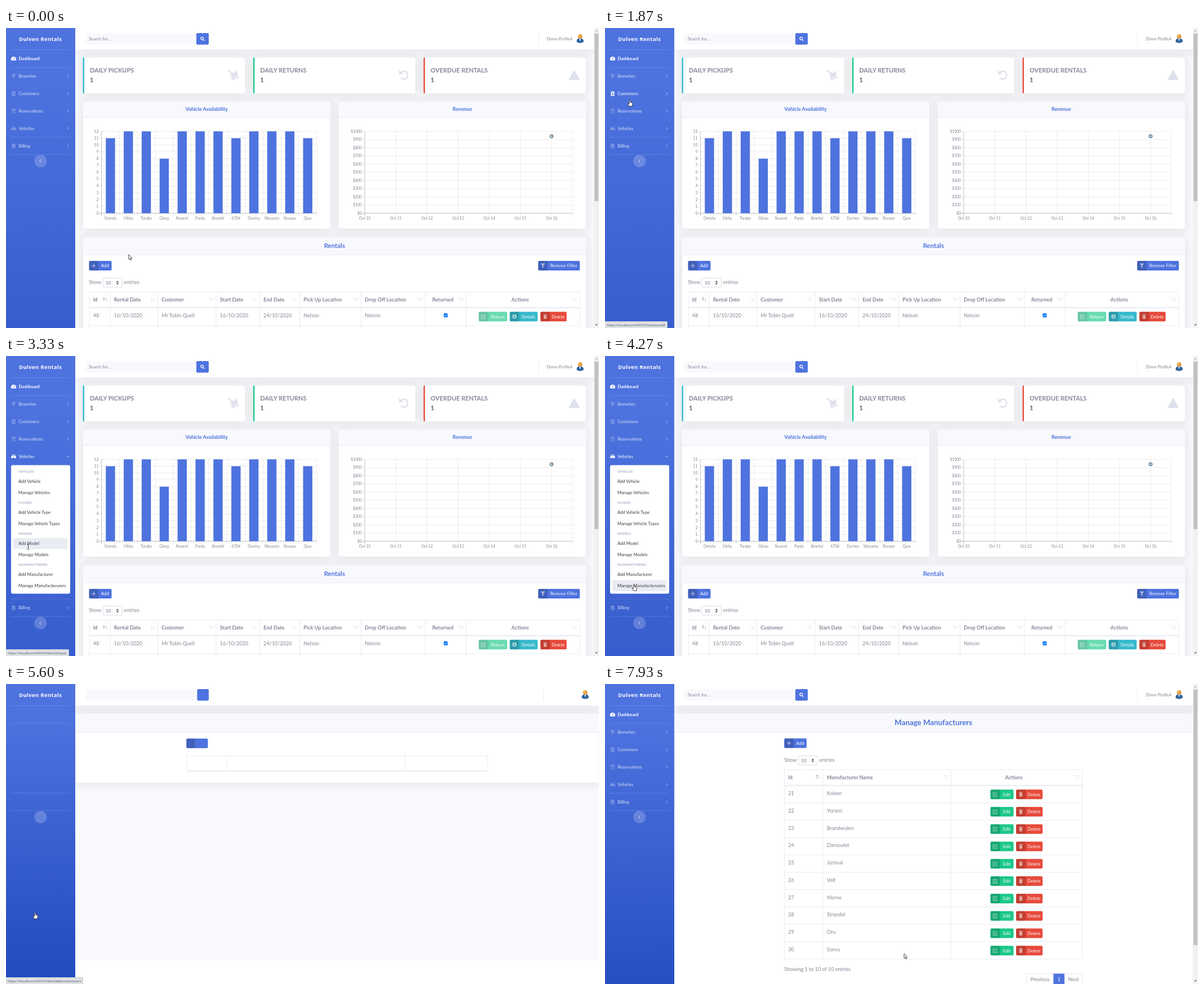
Write an HTML page that moves like this. It is 1053x532 px and loops after 8 s.

```html
<!DOCTYPE html>
<html lang="en">
<head>
<meta charset="utf-8">
<title>Rental dashboard</title>
<style>
  html, body { margin: 0; width: 100%; height: 100%; overflow: hidden; background: #fff; }
  #stage { position: absolute; left: 0; top: 0; width: 1053px; height: 532px; overflow: hidden; }
  svg { display: block; font-family: Lato, "Open Sans", sans-serif; }
  .page { display: none; }
  .dash #dash, .blank #blank, .list #list { display: inline; }
  .blank .ink { display: none; }
  .item { opacity: .8; }
  .item .icon { opacity: .38; }
  .item.on, .item.on .icon { opacity: 1; }
  .entry rect { fill: none; }
  .entry.on rect { fill: #eaecf4; }
  .entry.pressed rect { fill: #dddfeb; }
  #status {
    position: absolute; left: 0; bottom: 0; box-sizing: border-box; height: 12px; padding: 0 3px;
    background: #dee1e6; border: solid #c3c6ca; border-width: 1px 1px 0 0; border-radius: 0 2px 0 0;
    color: #50545a; font: 6.15px/11px "Open Sans", sans-serif; white-space: nowrap;
  }
  #pointer { position: absolute; left: 0; top: 0; overflow: visible; }
</style>
</head>
<body>
<div id="stage" class="dash">
  <svg id="view" width="1053" height="532" viewBox="0 0 1053 532"></svg>
  <div id="status"></div>
  <svg id="pointer" width="1" height="1"><path id="cursor" stroke-linejoin="round"/></svg>
</div>
<script>
const BLUE = '#4e73df', GREEN = '#1cc88a', CYAN = '#36b9cc', RED = '#e74a3b';
const GRAY = '#858796', LINE = '#e3e6f0', PALE = '#f8f9fc', FAINT = '#dddfeb';
const $ = id => document.getElementById(id);
const each = (list, fn) => list.map(fn).join('');

const text = (x, y, s, size = 9.05, fill = GRAY, weight = 400, anchor = 'start', more = '') =>
  `<text x="${x}" y="${y}" font-size="${size}" fill="${fill}" font-weight="${weight}" text-anchor="${anchor}" ${more}>${s}</text>`;
const rect = (x, y, w, h, fill, more = '') =>
  `<rect x="${x}" y="${y}" width="${w}" height="${h}" fill="${fill}" ${more}/>`;
const stroke = (d, color, width = .8, more = '') =>
  `<path d="${d}" fill="none" stroke="${color}" stroke-width="${width}" ${more}/>`;
const card = (x, y, w, h, r = 3) =>
  rect(x, y, w, h, '#fff', `rx="${r}" stroke="${LINE}" stroke-width=".6" filter="url(#shadow)"`);
const header = (x, y, w, h) =>
  rect(x, y, w, h, PALE, 'rx="2"') + stroke(`M${x} ${y + h}h${w}`, LINE);

const solid = d => `<path d="${d}" fill-rule="evenodd" fill="#fff"/>`;
const outline = (d, w = 1) => stroke(d, '#fff', w);
const ICON = {
  plus: outline('M-3.3 0H3.3M0-3.3V3.3', 1.3),
  filter: solid('M-4-4H4L1.1-.3V4L-1.1 2.4V-.3Z'),
  edit: outline('M1-3H-3.5V3.5H3V.5M-1 1.2L3.6-3.4', 1.1),
  trash: solid('M-3.3-4H-1L-.6-4.6H.6L1-4H3.3V-3H-3.3ZM-2.8-2.4H2.8L2.4 4H-2.4Z'),
  info: solid('M0-4A4 4 0 1 1 0 4A4 4 0 1 1 0-4ZM-.6-2.6V-1.4H.6V-2.6ZM-.7-.6V2.5H.7V-.6Z'),
  gauge: solid('M-4 3A4.6 4.6 0 1 1 4 3ZM.6 1.9L1.9-2L1.2-2.2L-.3 1.5A.8.8 0 0 0 .6 1.9Z'),
  pin: solid('M0 4.2C-1-.1-2.8.3-2.8-1.5A2.8 2.8 0 0 1 2.8-1.5C2.8.3 1-.1 0 4.2ZM0-2.6A1.1 1.1 0 1 0 0-.4A1.1 1.1 0 1 0 0-2.6Z'),
  book: solid('M-3-4H3V4H-3ZM0-2.4A1.2 1.2 0 1 0 0 0A1.2 1.2 0 1 0 0-2.4ZM-2 2.2H2Q2 .6 0 .6T-2 2.2Z'),
  calendar: solid('M-3.6-3.2H-2V-4.4H-1V-3.2H1V-4.4H2V-3.2H3.6V4H-3.6ZM-2.8-1.4V3.2H2.8V-1.4Z') + outline('M-1.8 0H1.8M-1.8 1.8H1.8', .8),
  car: solid('M-4.3 0L-3.3-.6L-2.4-3H2.4L3.3-.6L4.3 0V2.4H3.4V3.5H1.9V2.4H-1.9V3.5H-3.4V2.4H-4.3ZM-2.2-.7H2.2L1.6-2.1H-1.6Z'),
  file: solid('M-3-4H.8L3-1.8V4H-3ZM-1.6-.2H1.6V.6H-1.6ZM-1.6 1.6H1.6V2.4H-1.6Z'),
  search: outline('M1.7 1.2A2.4 2.4 0 1 0 1.2 1.7L3.6 4', 1.3)
};
const icon = (name, x, y, opacity = 1, cls = '') =>
  `<g class="${cls}" transform="translate(${x} ${y})"${cls ? '' : ` opacity="${opacity}"`}>${ICON[name]}</g>`;

const button = (x, y, w, color, name, label, opacity = 1) =>
  `<g opacity="${opacity}">` + rect(x, y, w, 17, color, 'rx="2"') + rect(x, y, 16.8, 17, '#000', 'rx="2" opacity=".16"') +
  icon(name, x + 8.4, y + 8.5, .55) + text(x + (16.8 + w) / 2, y + 11.3, label, 7.9, '#fff', 400, 'middle') + '</g>';

const sorter = (x, y, up) =>
  stroke(`M${x - 2} ${y + 3}V${y - 3}M${x - 3.5} ${y - 1.5}L${x - 2} ${y - 3}L${x - .5} ${y - 1.5}`, up ? GRAY : FAINT) +
  stroke(`M${x + 2} ${y - 3}V${y + 3}M${x + .5} ${y + 1.5}L${x + 2} ${y + 3}L${x + 3.5} ${y + 1.5}`, up ? '#b8bac6' : FAINT);

const pageSize = (x, y) =>
  text(x, y, 'Show') + rect(x + 25, y - 10.5, 34.5, 16.5, '#fff', 'rx="2.5" stroke="#d1d3e2" stroke-width=".8"') +
  text(x + 29.5, y + .8, '10', 8.4, '#6e707e') +
  `<path d="M${x + 48.5} ${y - 3}l2.2-2.5 2.2 2.5zm0 1.6h4.4l-2.2 2.5z" fill="#3a3b45"/>` + text(x + 62.3, y, 'entries');

const topbar = (right, full) => {
  const split = full ? 338 : 339.5;
  return rect(123, 0, 930, 38.5, '#fff', 'filter="url(#shadow)"') +
    rect(140.5, 9, split - 138, 20.5, PALE, 'rx="2.5"') + rect(split, 9, 360 - split, 20.5, BLUE, 'rx="2"') +
    (full ? text(147, 21.5, 'Search for...', 7.6, '#7d8090') + icon('search', 348.5, 18.7) +
      text(right - 38, 21.5, 'Demo Profile4', 7.2, GRAY, 400, 'end') : '') +
    stroke(`M${right - 98.5} 8.5V30`, LINE) +
    `<g transform="translate(${right - 24.5} 19)"><path d="M-6.3 5.5Q-6-1 0-1T6.3 5.5Q0 9.5-6.3 5.5Z" fill="#2a619f"/>
     <path d="M-1.6 0L0 5L1.6 0Z" fill="#dfe8f0"/><circle cy="-4" r="4" fill="#e39a3c"/><circle cx="-.8" cy="-5" r="2" fill="#f2bd6c"/></g>`;
};

const scrollbar = end =>
  rect(1044, 0, 9, 532, '#f1f1f1') + rect(1045, 10, 7, end - 10, '#c1c1c1') +
  '<path d="M1046.5 6.5l2-2.5 2 2.5z" fill="#a3a3a3"/><path d="M1046.5 525.5l2 2.5 2-2.5z" fill="#505050"/>';

// Dashboard
const stat = (x, color, label, art) =>
  card(x, 52, 288.5, 64) + `<path d="M${x + 2.4} 52h-.4q-2 0-2 2.5v59q0 2.5 2 2.5h.4z" fill="${color}"/>` +
  text(x + 12.5, 78.5, label, 10.9, GRAY, 700) + text(x + 12.5, 96, '1', 10.9, '#5a5c69', 700) +
  `<g transform="translate(${x + 267.5} 83.5)">${art}</g>`;

const dolly = stroke('M-10-7.5H-6.5L-2 5M1 6L9 3.2', FAINT, 2) +
  `<path d="M-4-4L-.5-5.3L.5-2.5L2.6-3.3L1.6-6L5-7.2L8 1L-1 4.2Z" fill="${FAINT}"/>` +
  `<circle cx="-1" cy="6.3" r="2" fill="#fff" stroke="${FAINT}" stroke-width="1.6"/>`;
const undo = stroke('M-6-3.5A7 7 0 1 1-5.2 5', FAINT, 2.3) + `<path d="M-8.5-8.5V-1.5H-1.5Z" fill="${FAINT}"/>`;
const warning = `<path fill-rule="evenodd" fill="${FAINT}" stroke="${FAINT}" stroke-linejoin="round" d="M0-8.3L9.3 8.3H-9.3ZM-1-3L-.6 2.5H.6L1-3ZM-1 4V6H1V4Z"/>`;

const chartCard = (x, title) =>
  card(x, 130, 439.5, 226) + header(x, 130, 439.5, 28.5) + text(x + 219.7, 146.8, title, 9, BLUE, 700, 'middle');
const grid = (left, right, rows, xs, label) => {
  let s = '';
  for (let i = 0; i <= rows; i++) {
    const y = 328.5 - 145.2 * i / rows;
    s += stroke(`M${left - 5} ${y}H${right}`, '#000', i ? .7 : .9, `opacity="${i ? .11 : .28}"`) +
      text(left - 5, y + 2.3, label(i), 6.8, GRAY, 400, 'end');
  }
  return s + each(xs, (x, i) => stroke(`M${x} 183.3V333.5`, '#000', i ? .7 : .9, `opacity="${i ? .11 : .28}"`));
};
const range = (n, fn) => Array.from({ length: n }, (_, i) => fn(i));

const MODELS = ['Ostrela', 'Vikka', 'Torabe', 'Glimp', 'Nuvent', 'Pardo', 'Brontel', '470K', 'Dorima', 'Wexanto', 'Rovane', 'Quiv'];
const STOCK = [11, 12, 12, 8, 12, 12, 12, 11, 12, 12, 12, 11];
const slot = 31.85;
const bars = grid(169.5, 551.7, 12, range(13, i => 169.5 + slot * i), i => i) +
  each(MODELS, (name, i) => {
    const x = 169.5 + slot * (i + .5), h = 12.1 * STOCK[i];
    return rect(x - 8.2, 328.5 - h, 16.4, h, BLUE) + text(x, 340, name, 6.75, GRAY, 400, 'middle');
  });
const day = i => 637 + 55.33 * i;
const revenue = grid(637, 1006, 10, [...range(7, day), 1006], i => '$' + i * 100) +
  each(range(7, i => i), i => text(day(i), 340, 'Oct ' + (10 + i), 6.75, GRAY, 400, 'middle')) +
  '<circle cx="968.8" cy="192" r="2.9" fill="#b3d0e2" stroke="#3f4f63" stroke-width="1"/>';

const COLS = [[148, 'Id', '48'], [185, 'Rental Date', '16/10/2020'], [269.5, 'Customer', 'Mr Tobin Quell'], [373, 'Start Date', '16/10/2020'],
  [450.5, 'End Date', '24/10/2020'], [521.5, 'Pick Up Location', 'Nelson'], [630.5, 'Drop Off Location', 'Nelson'],
  [744.5, 'Returned', ''], [817, 'Actions', ''], [1018.8]];
const rentals = card(136.5, 371, 893.5, 240) + header(136.5, 371, 893.5, 31) +
  text(583.3, 389.5, 'Rentals', 11.4, BLUE, 700, 'middle') +
  button(147.5, 413, 40, BLUE, 'plus', 'Add') + button(945, 413, 74, BLUE, 'filter', 'Remove Filter') + pageSize(147.2, 453.8) +
  each(COLS, ([x, head, cell], i) => {
    const line = stroke(`M${x} 468.5V532`, LINE);
    if (!head) return line;
    const next = COLS[i + 1][0], centred = i > 6, mid = i === 7 ? 775.7 : 913;
    return line + text(centred ? mid : x + 6.8, 485, head, 9.1, GRAY, 700, centred ? 'middle' : 'start') +
      text(x + 6.8, 513, cell) + sorter(next - 9, 481, i === 0);
  }) +
  stroke('M148 468.5H1018.8M148 527.5H1018.8', LINE) + stroke('M148 496H1018.8', LINE, 1.4) +
  rect(777.3, 506, 7, 7, '#0075ff', 'rx="1"') + outline('M778.8 509.5l1.5 1.6 2.7-3.4', 1) +
  button(839.5, 503.3, 50.5, GREEN, 'edit', 'Return', .65) + button(894.5, 503.3, 49.5, CYAN, 'info', 'Details') +
  button(949, 503.3, 46.5, RED, 'trash', 'Delete');

const dash = rect(123, 0, 930, 532, PALE) +
  stat(136.5, CYAN, 'DAILY PICKUPS', dolly) + stat(439, GREEN, 'DAILY RETURNS', undo) + stat(741.5, RED, 'OVERDUE RENTALS', warning) +
  chartCard(136.5, 'Vehicle Availability') + bars + chartCard(590.5, 'Revenue') + revenue + rentals +
  topbar(1044, true) + scrollbar(307);

// Page while it is still loading
const blank = rect(123, 0, 930, 490, PALE) + card(123, 52, 929.7, 123) + header(123, 52, 929.5, 33.3) +
  rect(320.3, 96.7, 38.2, 17, BLUE, 'rx="2"') + rect(320.3, 96.7, 15.5, 17, '#000', 'rx="2" opacity=".16"') +
  stroke('M320.5 154.3V127H855.3V154.3M391.7 127V154M708.5 127V154', LINE) + stroke('M320.2 154.3H855.6', LINE, 1.4) +
  topbar(1053, false);

// Manufacturer list
const MAKES = ['Kolsen', 'Yorami', 'Brandwulen', 'Darvoulet', 'Jorimai', 'Velt', 'Morve', 'Strandel', 'Oru', 'Sorvu'];
const list = rect(123, 0, 930, 532, PALE) + card(123, 52, 921, 600) + header(123, 52, 921, 33.3) +
  text(583.2, 73.2, 'Manage Manufacturers', 13.3, BLUE, 700, 'middle') +
  button(318.3, 96.5, 39.7, BLUE, 'plus', 'Add') + pageSize(318.3, 137.7) +
  text(325.3, 169, 'Id', 9.1, GRAY, 700) + text(394, 169, 'Manufacturer Name', 9.1, GRAY, 700) +
  text(726, 169, 'Actions', 9.1, GRAY, 700, 'middle') +
  sorter(378, 164.5, true) + sorter(605.5, 164.5) + sorter(838, 164.5) +
  stroke('M318.5 152H847.3M318.5 152V488M387 152V488M614.5 152V488M847.3 152V488', LINE) + stroke('M318.5 180H847.3', LINE, 1.4) +
  each(MAKES, (name, i) => {
    const y = 180 + 30.78 * i;
    return stroke(`M318.5 ${y + 30.78}H847.3`, LINE) + text(325.3, y + 17, 21 + i) + text(394, y + 17, name) +
      button(684.5, y + 7.2, 41, GREEN, 'edit', 'Edit') + button(730, y + 7.2, 47, RED, 'trash', 'Delete');
  }) +
  text(318.3, 508.7, 'Showing 1 to 10 of 10 entries') +
  rect(748.8, 514, 99, 22, '#fff', `rx="2.5" stroke="${FAINT}" stroke-width=".8"`) + rect(796.3, 513.6, 19.5, 22, BLUE) +
  text(772.6, 526.8, 'Previous', 9.05, GRAY, 400, 'middle') + text(806, 526.8, '1', 9.05, '#fff', 400, 'middle') +
  text(831.8, 526.8, 'Next', 9.05, GRAY, 400, 'middle') + topbar(1044, true) + scrollbar(463);

// Sidebar
const NAV = [['Dashboard', 54.5, 'gauge'], ['Branches', 85.5, 'pin'], ['Customers', 116.5, 'book'],
  ['Reservations', 147.2, 'calendar'], ['Vehicles', 178, 'car'], ['Billing', 209, 'file']];
const navItem = ([name, y, glyph], i) =>
  `<g class="item ink${i ? '' : ' on'}">` + icon(glyph, 13.5, y, 1, 'icon') + text(22.5, y + 2.7, name, 7.7, '#fff', i ? 400 : 700) +
  (i ? `<path class="arrow" transform="translate(109.7 ${y})" d="M-1.2-2.5L1.3 0L-1.2 2.5" fill="none" stroke="#fff" opacity=".65"/>` : '') + '</g>';
const divider = y => stroke(`M8.5 ${y}H114`, '#fff', .7, 'opacity=".2"');

const GROUPS = [['VEHICLES', 205, 'Add Vehicle', 'Manage Vehicles'], ['CLASSES', 260, 'Add Vehicle Type', 'Manage Vehicle Types'],
  ['MODELS', 315, 'Add Model', 'Manage Models'], ['MANUFACTURERS', 370, 'Add Manufacturer', 'Manage Manufacterurers']];
const entry = (y, label) =>
  `<g class="entry"><rect x="13" y="${y - 9.8}" width="96.7" height="19.6" rx="2.5"/>${text(22, y + 2.7, label, 7.65, '#3a3b45')}</g>`;
const ENTRY_Y = GROUPS.flatMap(([, y]) => [y + 17.5, y + 37.2]);
const menu = rect(9, 193.5, 105, 228, '#fff', 'rx="3"') + each(GROUPS, ([head, y, a, b]) =>
  text(22, y + 2, head, 5.8, '#b7b9cc', 900) + entry(y + 17.5, a) + entry(y + 37.2, b));

$('view').innerHTML = `<defs>
  <linearGradient id="side" x2="0" y2="1"><stop offset=".1" stop-color="${BLUE}"/><stop offset="1" stop-color="#224abe"/></linearGradient>
  <filter id="shadow" filterUnits="userSpaceOnUse" x="-50" y="-50" width="1200" height="800">
    <feDropShadow dx="0" dy="1.3" stdDeviation="7.5" flood-color="#3a3b45" flood-opacity=".15"/></filter>
  <clipPath id="fold"><rect id="foldBox" y="190" width="123" height="0"/></clipPath></defs>
  <g id="dash" class="page">${dash}</g><g id="blank" class="page">${blank}</g><g id="list" class="page">${list}</g>
  <rect id="sidebar" width="123" height="917" fill="url(#side)"/>
  ${text(61.3, 23, 'Dulven Rentals', 9.3, '#fff', 700, 'middle', 'font-family="Open Sans, sans-serif" letter-spacing=".44"')}
  ${divider(38.5) + divider(70) + each(NAV.slice(0, 5), navItem)}
  <g clip-path="url(#fold)">${menu}</g>
  <g id="below">${divider(193.5)}${navItem(NAV[5], 5)}${divider(224.5)}
    <circle cx="61.3" cy="236" r="11" fill="#fff" opacity=".2"/>
    <path class="ink" d="M62.4 233.4L59.8 236L62.4 238.6" fill="none" stroke="#fff" opacity=".7"/></g>`;

// Motion
const PATH = [[10, 218, 402], [330, 172, 335], [600, 95, 215], [870, 48, 127], [930, 50, 127], [1270, 83, 154], [1470, 66, 146],
  [1730, 45, 128], [1870, 44, 127.5], [2400, 42, 180], [3010, 42, 180], [3070, 42, 184], [3330, 39.5, 338], [3600, 40, 350],
  [3870, 42, 384], [4270, 51.5, 405], [6340, 51.5, 405], [6400, 71, 408], [6670, 260, 437], [6930, 480, 464], [7070, 543, 465],
  [7200, 553, 456], [7600, 440, 469], [7740, 440, 469], [7930, 531, 478]];
const STATUS = [[0, ''], [600, 'Dashboard#'], [3260, 'VehicleTypes'], [3460, 'VehicleModels'], [3930, ''], [4400, 'VehicleManufacturers'], [5660, '']];
const CURSOR = {
  arrow: 'M0 0V8.4L1.9 6.7L3.3 9.8L4.6 9.2L3.3 6.2H5.9Z',
  hand: 'M-1 .8Q0-.4 1 .8V4.3L4 5Q5.2 5.4 5 7L4.2 11.3H-1.2L-3.4 7.4Q-3.5 6-2.3 6.4L-1 7.6Z',
  beam: 'M-2-4.5Q0-4.5 0-3.5V3.5Q0 4.5-2 4.5M2-4.5Q0-4.5 0-3.5M0 3.5Q0 4.5 2 4.5'
};
const clamp = v => Math.max(0, Math.min(1, v));
const position = t => {
  const i = PATH.findIndex(p => p[0] > t);
  if (i < 1) return PATH[i ? PATH.length - 1 : 0].slice(1);
  const [a, b] = [PATH[i - 1], PATH[i]], k = (t - a[0]) / (b[0] - a[0]);
  return [a[1] + (b[1] - a[1]) * k, a[2] + (b[2] - a[2]) * k];
};
const items = [...document.querySelectorAll('.item')], entries = [...document.querySelectorAll('.entry')];
const vehicleArrow = items[4].querySelector('.arrow');

function render(ms) {
  const t = Math.floor((ms % 8000 + 5) * .015) / .015 + 3;
  const page = t < 5600 ? 'dash' : t < 5660 ? 'blank' : 'list';
  const open = page === 'dash' ? clamp((t - 2560) / 240) : 0, shift = 237.5 * open;
  const [x, y] = position(t);
  $('stage').className = page;
  $('sidebar').setAttribute('height', { dash: 917, blank: 532, list: 601 }[page]);
  $('foldBox').setAttribute('height', shift);
  $('below').setAttribute('transform', `translate(0 ${shift})`);
  vehicleArrow.setAttribute('transform', `translate(109.7 178) rotate(${open ? 90 : 0})`);

  const navHover = NAV.findIndex(([, ny], i) => x < 114 && Math.abs(y - ny - (i === 5 ? shift : 0)) < 15.4);
  const entryHover = open === 1 ? ENTRY_Y.findIndex(ey => x > 13 && x < 110 && Math.abs(y - ey) < 9.9) : -1;
  items.forEach((el, i) => el.classList.toggle('on', i === 0 || i === navHover || (i === 4 && open > 0 && t < 5200)));
  entries.forEach((el, i) => {
    el.classList.toggle('on', i === entryHover);
    el.classList.toggle('pressed', i === entryHover && t >= 5200);
  });

  const link = navHover >= 0 || entryHover >= 0 || page === 'blank';
  const shape = t > 3320 && t < 3390 ? 'beam' : link ? 'hand' : 'arrow';
  const cursor = $('cursor');
  cursor.setAttribute('d', CURSOR[shape]);
  cursor.setAttribute('transform', `translate(${x} ${y})`);
  cursor.setAttribute('fill', shape === 'beam' ? 'none' : '#fff');
  cursor.setAttribute('stroke', '#111');
  cursor.setAttribute('stroke-width', .75);

  const [, route] = STATUS.filter(s => s[0] <= t).pop();
  $('status').style.display = route ? 'block' : 'none';
  $('status').textContent = 'https://localhost:44347/' + route;
}

let start;
function tick(now) {
  start ??= now;
  render(now - start);
  requestAnimationFrame(tick);
}
render(0);
requestAnimationFrame(tick);
</script>
</body>
</html>
```
